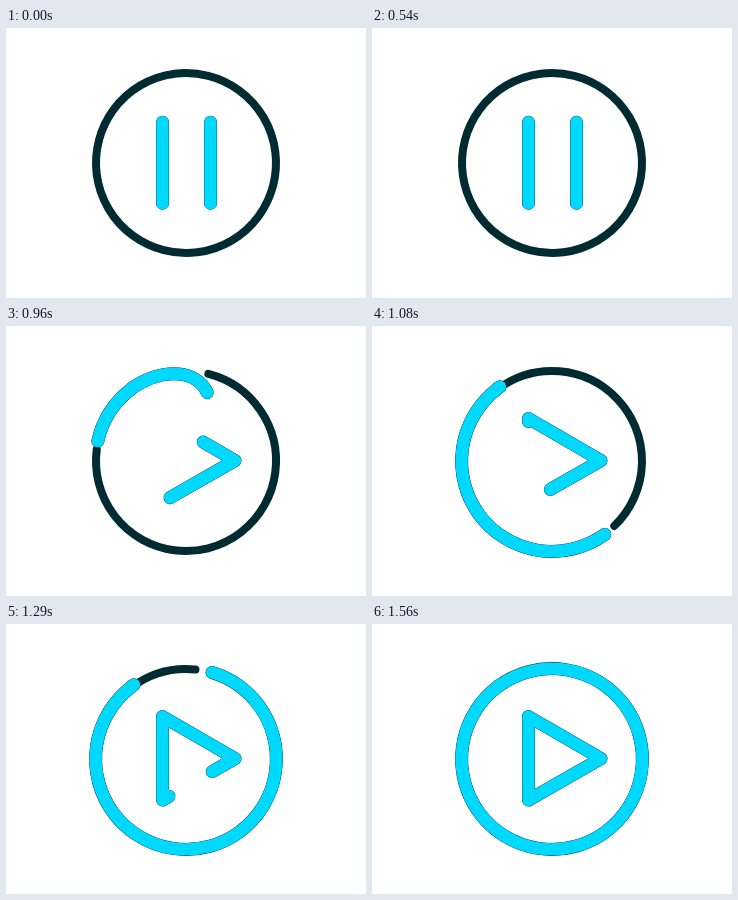
Write an HTML page with a canvas that moves like this. It is 360 px wide and 270 px high and loops after 2.49 s.

```html
<!DOCTYPE html>
<html lang="en">
<head>
<meta charset="utf-8">
<title>Pause to play</title>
<style>
  html, body { margin: 0; width: 100%; height: 100%; overflow: hidden; background: #fff; }
  canvas { display: block; width: 360px; height: 270px; }
</style>
</head>
<body>
<canvas id="stage" width="360" height="270"></canvas>
<script>
const ctx = document.getElementById('stage').getContext('2d');
const CYAN = '#00d9ff', DARK = '#002b30', WHITE = '#fff';
const LOOP = 2490, STEP = 30;
const CX = 180, CY = 135, RADIUS = 90.4;
const JOIN = Math.atan2(-73, -54);   // where the right bar meets the ring
const JOIN_DISTANCE = 192;
const OPENING = -1.32;               // where the dark ring splits
const OPENING_DISTANCE = 109;

// The left bar runs once around the triangle.
const trianglePath = new Path2D(
  'M156.5 94.25 V176 L229 134.5 L156.5 92.5 V176 L229 134.5');

// The right bar climbs, bends over and follows the ring counterclockwise.
const ringPath = new Path2D('M204.5 175.25 V82 C204.5 49 167 35 126 62');
ringPath.arc(CX, CY, RADIUS, JOIN, JOIN - 2 * Math.PI, true);

// Travelled distance of each stroke end over time.
const times = [555, 780, 960, 1080, 1290, 1560];
const triangle = { tail: [0, 16, 90.5, 107, 139, 165], head: [81, 92, 202, 252, 340, 416] };
const ring = { tail: [0, 19.5, 109, 192, 192, 192], head: [81, 92, 259, 477, 678, 762] };

function slopeAt(values, i) {
  if (i === 0 || i === times.length - 1) return 0;
  const before = (values[i] - values[i - 1]) / (times[i] - times[i - 1]);
  const after = (values[i + 1] - values[i]) / (times[i + 1] - times[i]);
  return before * after > 0 ? 2 * before * after / (before + after) : 0;
}

// Monotone cubic interpolation, so no end ever moves backwards.
function valueAt(values, t) {
  const last = times.length - 1;
  if (t <= times[0]) return values[0];
  if (t >= times[last]) return values[last];
  const i = times.findIndex(time => time > t) - 1;
  const span = times[i + 1] - times[i];
  const p = (t - times[i]) / span;
  const ease = p * p * (3 - 2 * p);
  return values[i] + (values[i + 1] - values[i]) * ease
    + span * p * (1 - p) * ((1 - p) * slopeAt(values, i) - p * slopeAt(values, i + 1));
}

function strokePath(path, color, width) {
  ctx.strokeStyle = color;
  ctx.lineWidth = width;
  ctx.stroke(path);
}

function strokePart(path, track, t) {
  const tail = valueAt(track.tail, t), head = valueAt(track.head, t);
  ctx.setLineDash([head - tail, 2000]);
  ctx.lineDashOffset = -tail;
  strokePath(path, DARK, 13);
  strokePath(path, CYAN, 12.4);
  ctx.setLineDash([]);
}

// Angle on the dark ring beside a point at this distance along ringPath.
function ringAngle(distance) {
  if (distance >= JOIN_DISTANCE) return JOIN - (distance - JOIN_DISTANCE) / RADIUS;
  const p = (distance - OPENING_DISTANCE) / (JOIN_DISTANCE - OPENING_DISTANCE);
  return OPENING + (JOIN - OPENING) * Math.max(0, p);
}

// The dark ring shrinks a little ahead of the cyan head and closes behind its tail.
function drawDarkRing(t) {
  const from = ringAngle(valueAt(ring.head, t) * 1.022);
  const to = ringAngle(valueAt(ring.tail, t)) - 2 * Math.PI;
  if (from <= to) return;
  const path = new Path2D();
  path.arc(CX, CY, 90, from, to, true);
  strokePath(path, DARK, 8);
}

function draw(t) {
  ctx.fillStyle = WHITE;
  ctx.fillRect(0, 0, 360, 270);
  ctx.lineCap = ctx.lineJoin = 'round';
  drawDarkRing(t);
  strokePart(ringPath, ring, t);
  strokePart(trianglePath, triangle, t);
}

const start = performance.now();
function tick() {
  const t = (performance.now() - start) % LOOP;
  draw(Math.floor(t / STEP) * STEP);
  requestAnimationFrame(tick);
}
tick();
</script>
</body>
</html>
```
